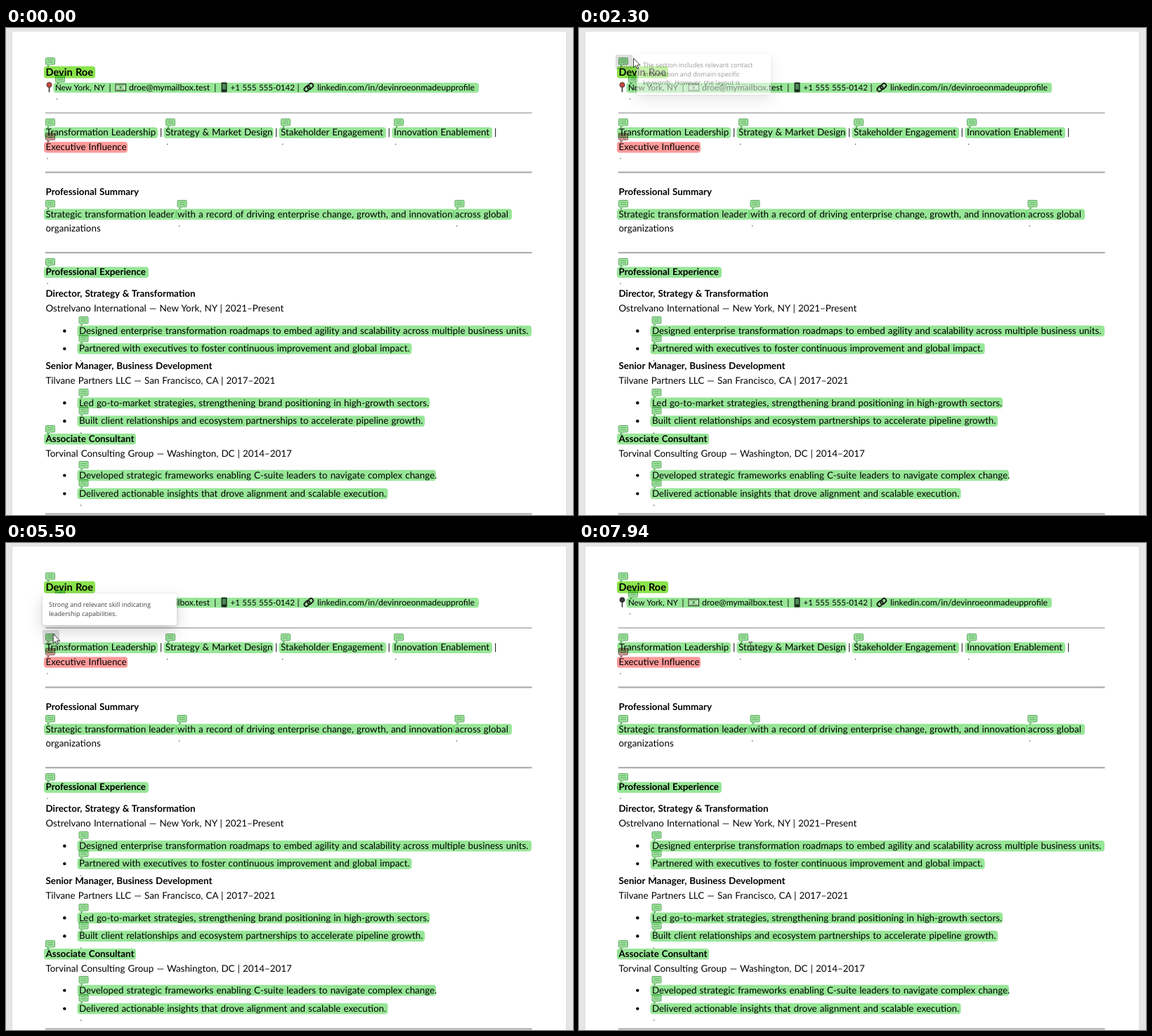
An HTML page that plays this animation: 807x694 px, repeating every 8000 ms.

```html
<!DOCTYPE html>
<html lang="en">
<head>
<meta charset="utf-8">
<title>Annotated resume</title>
<style>
  html, body { margin: 0; width: 100%; height: 100%; overflow: hidden; background: #e6e6e6; }
  svg { position: absolute; left: 0; top: 0; width: 807px; height: 694px; }
  text { font-family: Lato, sans-serif; word-spacing: .05em; text-rendering: geometricPrecision; white-space: pre; }
  .mark, .note, .hover { mix-blend-mode: multiply; }
  .tip {
    position: absolute; box-sizing: border-box; width: 191px; padding: 10px 0 10px 9px;
    border-radius: 3px; background: #fff; color: #424242; white-space: nowrap; opacity: 0;
    font: 9.1px/12.6px "Open Sans", sans-serif; text-rendering: geometricPrecision;
    box-shadow: 0 9px 22px rgba(0, 0, 0, .17), 0 1px 4px rgba(0, 0, 0, .15);
  }
</style>
</head>
<body>
<svg id="page" viewBox="0 0 807 694">
  <rect x="8.5" y="4.5" width="789" height="700" fill="#fff" stroke="#dedede"/>
  <g id="marks"></g>
  <g id="words"></g>
  <g id="emoji">
    <path d="M61.5 84V91.5" stroke="#333" stroke-width="1.6"/>
    <circle id="pin" cx="61.5" cy="81" r="3.6" stroke="#222" stroke-width=".7"/>
    <rect x="156" y="80" width="14.5" height="9.5" fill="#b9e8b4" stroke="#222"/>
    <path d="M158 82H168.5M158 87.5H168.5" stroke="#4b8a4b" stroke-width=".8"/>
    <circle cx="163.2" cy="84.8" r="1.8" fill="#4b8a4b"/>
    <rect x="306.5" y="77.5" width="8" height="14" rx="1.2" fill="#1d2a1f"/>
    <rect x="308" y="79.5" width="5" height="8" fill="#4d8a55"/>
    <g transform="translate(431 84.5) rotate(-45)" fill="none" stroke="#1c1c1c" stroke-width="1.9">
      <rect x="-7.5" y="-3.5" width="9" height="6" rx="3"/>
      <rect x="-2" y="-2.5" width="9" height="6" rx="3"/>
    </g>
  </g>
  <g id="notes"></g>
  <g id="hovers"></g>
</svg>
<div id="tips"></div>
<svg id="pointer" viewBox="0 0 807 694">
  <path id="arrow" d="M0 0V13.5L3.2 10.6L5.2 15L7.2 14L5.3 9.9H9.6Z" fill="#fff" stroke="#222" stroke-width=".9"/>
  <path id="beam" d="M-3 -6H-1Q0 -6 0 -5V5Q0 6 -1 6H-3M3 -6H1Q0 -6 0 -5M0 5Q0 6 1 6H3" fill="none" stroke="#333"/>
</svg>
<script>
const $ = id => document.getElementById(id);
const GREEN = '#97e697', LIME = '#8ae34c', RED = '#ff9a9a';

function add(parent, tag, attrs, text) {
  const el = document.createElementNS('http://www.w3.org/2000/svg', tag);
  for (const key in attrs) el.setAttribute(key, attrs[key]);
  if (text) el.textContent = text;
  $(parent).append(el);
  return el;
}

// The widest bullet fills the column; every other size follows from it.
const COLUMN = 641;
const widest = 'Designed enterprise transformation roadmaps to embed agility and scalability across multiple business units.';
const pen = document.createElement('canvas').getContext('2d');
pen.font = '100px Lato, sans-serif';
const gaps = widest.split(' ').length - 1;
const SIZE = 100 * COLUMN / (pen.measureText(widest).width + gaps * 5);

function write(x, y, text, { bold, scale = 1, middle } = {}) {
  add('words', 'text', {
    x, y, 'font-size': SIZE * scale, 'font-weight': bold ? 700 : 400,
    'text-anchor': middle ? 'middle' : 'start'
  }, text);
}

function mark(x, end, y, fill = GREEN, scale = 1) {
  add('marks', 'rect', {
    class: 'mark', x, y: y - 12 * scale, width: end - x, height: 15.5 * scale, rx: 4, fill
  });
}

function marked(x, end, y, text, opts = {}) {
  mark(x - 2.5, end, y, opts.fill, opts.scale);
  write(x, y, text, opts);
}

function bullet(y, end, text) {
  add('words', 'circle', { cx: 83.3, cy: y - 4.2, r: 2.2 });
  marked(104, end, y, text);
}

function note(x, y, red) {
  const g = add('notes', 'g', {
    class: 'note', transform: `translate(${x} ${y})`,
    fill: red ? '#d89c9c' : '#9be09b', stroke: red ? '#805c5c' : '#64ab67'
  });
  g.innerHTML = '<path d="M1.5 .5H12.5Q13.5 .5 13.5 1.5V9Q13.5 10 12.5 10H6.5L3.5 13.5V10H1.5Q.5 10 .5 9V1.5Q.5 .5 1.5 .5Z"/>' +
    '<path d="M3 3.7H11M3 6.7H11" stroke-width=".9"/>';
}

// Heading and contact line
const small = { scale: .91 }, compact = { scale: .86 };
marked(56.5, 127, 67.6, 'Devin Roe', { bold: true, scale: 1.09, fill: LIME });
mark(67.5, 673, 89, GREEN, .91);
write(70, 89, 'New York, NY', compact);
write(175, 89, 'droe@mymailbox.test', small);
write(319.5, 89, '+1 555 555-0142', compact);
write(443, 89, 'linkedin.com/in/devinroeonmadeupprofile', small);
for (const x of [148, 297.7, 416]) write(x, 89, '|', { scale: .91, middle: true });

// Skills
marked(57, 216, 153.4, 'Transformation Leadership');
marked(227, 380.5, 153.4, 'Strategy & Market Design');
marked(391, 541, 153.4, 'Stakeholder Engagement');
marked(552, 692, 153.4, 'Innovation Enablement');
for (const x of [220.7, 384.8, 545.3, 696.6]) write(x, 153.4, '|', { middle: true });
marked(56.5, 173, 174.2, 'Executive Influence', { fill: RED });

// Summary
const bold = { bold: true };
write(56.5, 237.8, 'Professional Summary', bold);
marked(56.5, 243, 269.8, 'Strategic transformation leader');
marked(244, 638, 269.8, 'with a record of driving enterprise change, growth, and innovation');
marked(639, 720, 269.8, 'across global');
write(56.5, 290.4, 'organizations');

// Experience
marked(56.5, 203, 352.4, 'Professional Experience', bold);
write(56.5, 383.2, 'Director, Strategy & Transformation', bold);
write(56.5, 403.9, 'Ostrelvano International — New York, NY | 2021–Present');
bullet(435.9, 748, widest);
bullet(461.3, 577.5, 'Partnered with executives to foster continuous improvement and global impact.');
write(56.5, 486.4, 'Senior Manager, Business Development', bold);
write(56.5, 507.2, 'Tilvane Partners LLC — San Francisco, CA | 2017–2021');
bullet(538.5, 603, 'Led go-to-market strategies, strengthening brand positioning in high-growth sectors.');
bullet(564.4, 596, 'Built client relationships and ecosystem partnerships to accelerate pipeline growth.');
marked(56.5, 185, 589.9, 'Associate Consultant', bold);
write(56.5, 610.6, 'Torvinal Consulting Group — Washington, DC | 2014–2017');
bullet(641.8, 612, 'Developed strategic frameworks enabling C-suite leaders to navigate complex change.');
bullet(667.8, 543.5, 'Delivered actionable insights that drove alignment and scalable execution.');

for (const [y, h] of [[120.2, 1.6], [204.5, 2.3], [319, 2.3], [691.3, 2.3]])
  add('words', 'rect', { x: 56, y, width: 692.5, height: h, fill: '#b0b0b2' });

for (const [x, y] of [[72, 101], [229, 165.5], [393, 165.5], [554, 165.5], [58.5, 186], [58.5, 282.5],
  [246, 282], [641, 282], [58.5, 364], [106, 474], [106, 577], [106, 680]])
  add('words', 'rect', { x, y: y - .5, width: 1.2, height: 1.2, fill: '#333' });

const left = [42, 129, 245, 328, 566], inner = [411, 437, 514, 540, 617, 643];
left.forEach(y => note(56, y));
inner.forEach(y => note(103.5, y));
[227, 391, 552].forEach(x => note(x, 129));
[243.5, 638.5].forEach(x => note(x, 245));
note(70, 67);
note(56, 149.5, true);

// Tooltips: box corner, hovered note corner, [start, shown, leave, gone], lines
const tips = [
  [222, 72, 222, 124, [1670, 1810, 1811, 1945], 'Strong and relevant skill indicating', 'market design expertise.'],
  [82, 37, 52, 38, [2160, 2430, 3640, 3780], 'The section includes relevant contact', 'information and domain-specific', 'keywords. However, the layout is ...'],
  [52, 72, 52, 124, [4335, 4340, 5570, 5710], 'Strong and relevant skill indicating', 'leadership capabilities.'],
  [387, 72, 386, 124, [6860, 7200, 7810, 7880], 'Strong and relevant skill indicating', 'collaboration abilities.']
].map(([x, y, hx, hy, span, ...lines]) => {
  const box = document.createElement('div');
  box.className = 'tip';
  box.style.left = x + 'px';
  box.style.top = y + 'px';
  box.innerHTML = lines.join('<br>');
  $('tips').append(box);
  const hover = add('hovers', 'rect', { class: 'hover', x: hx, y: hy, width: 24, height: 21, rx: 2, fill: '#dedede' });
  return { box, hover, span };
});

// Pointer moves: start, end, steps, x, y, shape
const moves = [
  [790, 930, 3, 518, 267.5, 'beam'],
  [1260, 1470, 4, 267, 141.5, 'beam'],
  [1670, 1740, 2, 236, 133, 'arrow'],
  [1810, 1950, 3, 80, 46.5, 'beam'],
  [2020, 2160, 3, 77.5, 43, 'arrow'],
  [3570, 4270, 11, 72.5, 125, 'arrow'],
  [4340, 4340, 1, 68, 128, 'arrow'],
  [4410, 4620, 4, 66.5, 129.5, 'arrow'],
  [5500, 6250, 12, 374, 128, 'arrow'],
  [6320, 6460, 3, 386.5, 128, 'arrow'],
  [6860, 7000, 3, 393, 131, 'arrow'],
  [7810, 7940, 3, 244, 147, 'beam']
];
const OFFSTAGE = [0, 0, 1, 998, 1084, 'beam'];

const easeOut = u => 1 - (1 - u) ** 2;
const easeInOut = u => u < .5 ? 4 * u ** 3 : 1 - 4 * (1 - u) ** 3;
const clamp = v => Math.max(0, Math.min(1, v));

function pointerAt(t) {
  const i = moves.findLastIndex(m => t >= m[0]);
  if (i < 0) return OFFSTAGE.slice(3);
  const [start, end, steps, x, y, shape] = moves[i];
  const [, , , px, py] = moves[i - 1] || OFFSTAGE;
  const gap = (end - start) / (steps - 1) || 1;
  const step = Math.min(steps, Math.floor((t - start) / gap + 1e-6) + 1);
  const p = (steps > 4 ? easeInOut : easeOut)(step / steps);
  return [px + (x - px) * p, py + (y - py) * p, shape];
}

function draw(t) {
  const [x, y, shape] = pointerAt(t);
  for (const id of ['arrow', 'beam']) {
    $(id).setAttribute('transform', `translate(${x} ${y})`);
    $(id).style.display = id === shape ? '' : 'none';
  }
  for (const { box, hover, span: [start, shown, leave, gone] } of tips) {
    box.style.opacity = Math.min(clamp((t - start) / (shown - start)), clamp((gone - t) / (gone - leave)));
    hover.style.display = t >= start && t < leave ? '' : 'none';
  }
  $('pin').setAttribute('fill', t < 3640 ? '#c4473f' : '#3a3a3a');
}

const LOOP = 8000, began = performance.now();
function tick() {
  draw((performance.now() - began) % LOOP);
  requestAnimationFrame(tick);
}
tick();
</script>
</body>
</html>
```
